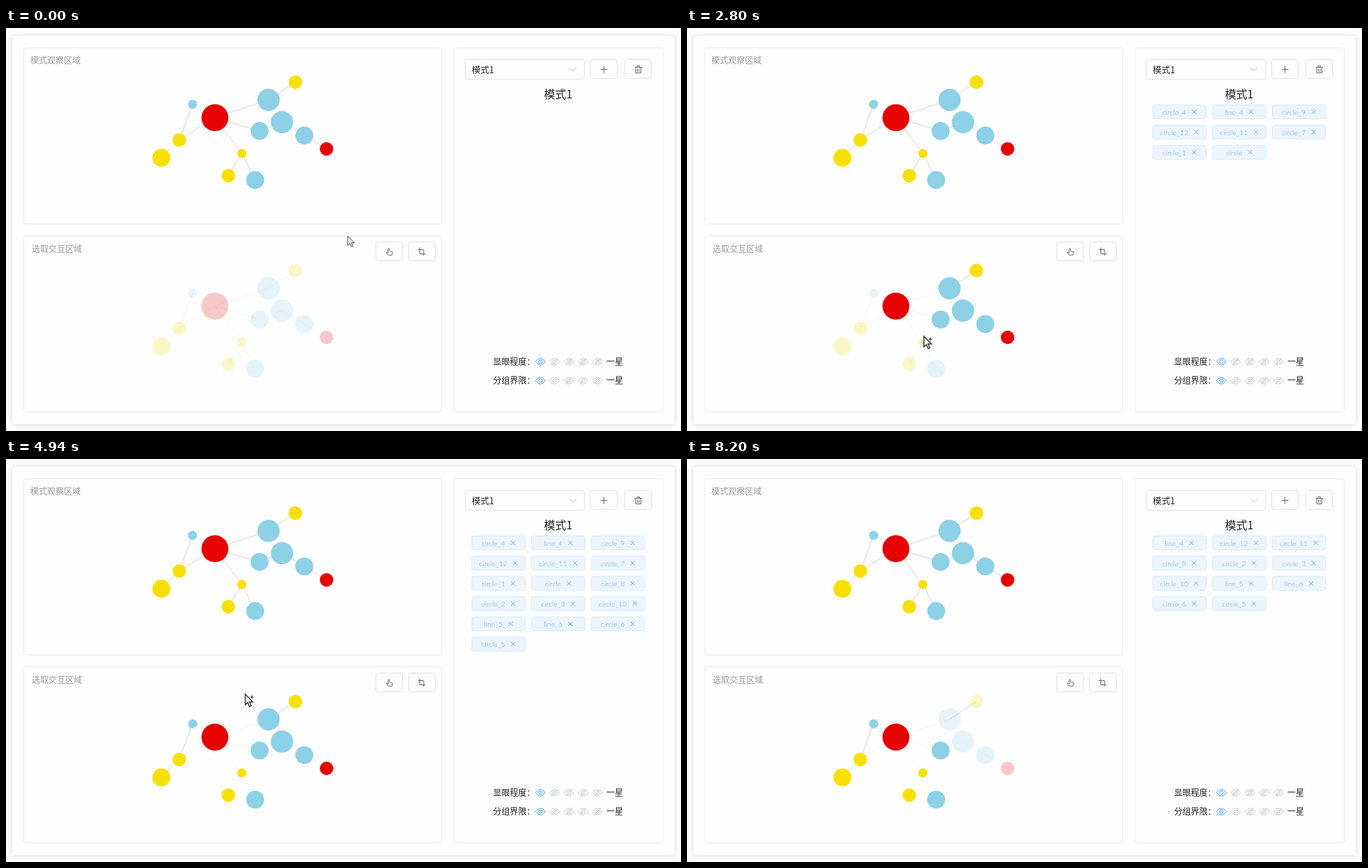
Write an HTML page that moves like this. It is 968 px wide and 579 px high and loops after 8.23 s.

```html
<!DOCTYPE html>
<html lang="zh">
<head>
<meta charset="utf-8">
<style>
html, body { margin: 0; width: 100%; height: 100%; overflow: hidden; background: #fdfefd; }
svg { display: block; }
text { font: 12px "Noto Sans CJK SC", "Noto Sans CJK", sans-serif; font-weight: 300; fill: #222; }
.box { fill: #fdfefd; stroke: #e9ebf1; }
.button { fill: #fdfefd; stroke: #dfe2e9; }
.icon { fill: none; stroke: #666; stroke-width: 1; stroke-linecap: round; stroke-linejoin: round; }
.muted { fill: #999; }
.edge { stroke: #c9cacc; stroke-width: .8; }
.tag rect { fill: #ecf5fd; stroke: #d9eafa; }
.tag text { font: 300 10.5px Lato, "Open Sans", sans-serif; fill: #62a6e3; }
.tag path { stroke: #559fe5; stroke-width: .9; }
</style>
</head>
<body>
<svg width="968" height="579" viewBox="0 0 968 579">
  <defs>
    <filter id="shadow" x="-5%" y="-5%" width="110%" height="110%">
      <feDropShadow dx="0" dy="1" stdDeviation="4" flood-color="#000" flood-opacity=".11"/>
    </filter>
    <path id="eye" d="M-7 0Q0-9.6 7 0Q0 9.6-7 0ZM-2.5 0a2.5 2.5 0 1 0 5 0a2.5 2.5 0 1 0-5 0"/>
  </defs>
  <rect x="8.5" y="10.5" width="951" height="559" rx="3" class="box" filter="url(#shadow)"/>
  <rect x="25.5" y="28.5" width="599" height="253" rx="3" class="box"/>
  <rect x="25.5" y="298.5" width="599" height="253" rx="3" class="box"/>
  <rect x="642.5" y="28.5" width="300" height="523" rx="3" class="box"/>
  <text x="35" y="50.5" class="muted">模式观察区域</text>
  <text x="37" y="321.5" class="muted">选取交互区域</text>

  <rect x="658.5" y="45.5" width="171" height="28" rx="3" class="button"/>
  <text x="668" y="64.5" style="font-size:12.5px">模式1</text>
  <path d="M808.5 57.5l4.5 4.5l4.5-4.5" class="icon" style="stroke:#b9bdc6"/>
  <g id="buttons"></g>
  <path d="M853 59.5h9M857.5 55v9" class="icon"/>
  <path d="M902 56.5h9.5M905 56v-1.5h3.5V56M903 57v7.5h7.5V57M905.5 59v3.5M908 59v3.5" class="icon"/>
  <path d="M548 323v-5.5q1-1.6 2 0v3.2l3 .6q1.5.3 1.2 1.8l-.7 3.2h-5l-3.4-3.5q.4-1.4 2.9.2" class="icon"/>
  <path d="M593.5 316v8.5h7.5M591 318.500h8v8" class="icon"/>
  <text x="792" y="100.500" text-anchor="middle" style="font-size:16px">模式1</text>
  <g id="ratings"></g>
  <g id="overview"></g>
  <g id="picker"></g>
  <g id="tags"></g>

  <g id="toast">
    <rect x="425.500" y="2.500" width="118" height="32" rx="4" fill="#f1f1f2" stroke="#e3e4e8"/>
    <circle cx="445" cy="18.500" r="5.300" fill="#8f9194"/>
    <path d="M445.200 18v3.500M445.200 15.300v1" stroke="#fff" stroke-width="1.400"/>
    <text x="457.500" y="23.500" style="fill:#909399">进入路径模式</text>
  </g>
  <g id="cursor">
    <path id="arrow" d="M0 0V14L3.300 11L5.700 16.300L7.900 15.300L5.500 10.200H10Z" fill="#fff" stroke="#333"/>
    <path id="plus" d="M9.500 1.500v5M7 4h5" stroke="#222"/>
  </g>
</svg>
<script>
const LOOP = 8230;
const SHIFT = 270.8;
const $ = id => document.getElementById(id);

function add(parent, name, attrs, content = '') {
  const el = document.createElementNS('http://www.w3.org/2000/svg', name);
  for (const key in attrs) el.setAttribute(key, attrs[key]);
  el.textContent = content;
  return parent.appendChild(el);
}

const RED = '#e60000', BLUE = '#8cd1e6', YELLOW = '#f7e000';
const nodes = {
  circle_4: [415, 77.7, 9.7, YELLOW],
  circle_9: [376.5, 103.2, 16, BLUE],
  circle_12: [299.6, 128.8, 19.3, RED],
  circle_11: [363.7, 148, 12.9, BLUE],
  circle_7: [395.8, 135.2, 16, BLUE],
  circle_1: [427.800, 154.500, 12.9, BLUE],
  circle: [459.700, 173.700, 9.700, RED],
  circle_8: [338.200, 180.200, 6.500, YELLOW],
  circle_2: [318.800, 212.200, 9.700, YELLOW],
  circle_3: [357.300, 218.500, 12.900, BLUE],
  circle_10: [222.800, 186.500, 12.900, YELLOW],
  circle_6: [248.500, 160.900, 9.700, YELLOW],
  circle_5: [267.600, 109.700, 6.500, BLUE]
};
const edges = [
  ['line_1', 'circle_12', 'circle_9'], ['line_4', 'circle_9', 'circle_4'],
  ['line_2', 'circle_12', 'circle_11'], ['line_7', 'circle_11', 'circle_7'],
  ['line_8', 'circle_7', 'circle_1'], ['line_9', 'circle_1', 'circle'],
  ['line_3', 'circle_12', 'circle_8'], ['line_10', 'circle_8', 'circle_2'],
  ['line_11', 'circle_8', 'circle_3'], ['line', 'circle_12', 'circle_6'],
  ['line_5', 'circle_6', 'circle_10'], ['line_6', 'circle_6', 'circle_5']
];

function drawGraph(parent, dy) {
  const parts = {};
  for (const [id, a, b] of edges) {
    const [x1, y1] = nodes[a], [x2, y2] = nodes[b];
    parts[id] = add(parent, 'line', { x1, y1: y1 + dy, x2, y2: y2 + dy, class: 'edge' });
  }
  for (const id in nodes) {
    const [cx, cy, r, fill] = nodes[id];
    parts[id] = add(parent, 'circle', { cx, cy: cy + dy, r, fill });
  }
  return parts;
}

drawGraph($('overview'), 0);
const parts = drawGraph($('picker'), SHIFT);

for (const [x, y] of [[838.5, 45.5], [887.5, 45.5], [530.5, 307.5], [577.5, 307.5]])
  add($('buttons'), 'rect', { x, y, width: 38, height: 27, rx: 3, class: 'button' });

[['显眼程度：', 479.5], ['分组界限：', 506.7]].forEach(([label, y]) => {
  const row = $('ratings');
  add(row, 'text', { x: 698.5, y: y + 4.5 }, label);
  add(row, 'text', { x: 861, y: y + 4.500 }, '一星');
  for (let i = 0; i < 5; i++) {
    const transform = `translate(${766.3 + i * 20.5} ${y})`;
    const stroke = i ? '#c3c6cc' : '#409eff';
    add(row, 'use', { href: '#eye', transform, fill: 'none', stroke });
    if (i) add(row, 'path', { d: 'M-5 5L5-5', transform, stroke });
  }
});

// Cursor stops: time, x, y, parts toggled there
const stops = [
  [0, 490, 299], [120, 492, 301], [420, 547, 318], [560, 547, 318],
  [900, 460, 330], [1120, 415, 348, 'circle_4'], [1260, 396, 361, 'line_4'],
  [1400, 377, 374, 'circle_9'], [1740, 300, 396, 'circle_12'], [1840, 276, 400],
  [2080, 364, 419, 'circle_11'], [2220, 396, 406, 'circle_7'],
  [2350, 428, 425, 'circle_1'], [2470, 460, 444, 'circle'], [2640, 395, 455],
  [2800, 340, 443], [2860, 338, 450, 'circle_8'], [3040, 319, 483, 'circle_2'],
  [3240, 357, 489, 'circle_3'], [3420, 300, 515], [3580, 200, 480],
  [3700, 208, 435], [3860, 223, 457, 'circle_10'], [3980, 236, 444, 'line_5'],
  [4080, 255, 412, 'line_6'], [4180, 248, 431, 'circle_6'],
  [4380, 267, 380, 'circle_5'], [4640, 305, 345], [4940, 343, 338],
  [5060, 350, 338], [5300, 415, 348, 'circle_4'], [5520, 377, 374, 'circle_9'],
  [5740, 396, 406, 'circle_7'], [5940, 428, 425, 'circle_1'],
  [6140, 460, 444, 'circle'], [6500, 497, 461], [6900, 499, 462],
  [7050, 500, 455], [7650, 520, -25], [LOOP, 520, -40]
];

function cursorAt(t) {
  const i = Math.max(0, stops.findIndex(s => s[0] > t) - 1);
  const at = k => stops[Math.max(0, Math.min(stops.length - 1, k))];
  const [a, b, c, d] = [at(i - 1), at(i), at(i + 1), at(i + 2)];
  const u = (t - b[0]) / (c[0] - b[0]);
  const slope = (p, q) => k => (q[k] - p[k]) / (q[0] - p[0] || 1) * (c[0] - b[0]);
  const start = slope(a, c), end = slope(b, d);
  return [1, 2].map(k =>
    (1 + 2 * u) * (1 - u) ** 2 * b[k] + u * (1 - u) ** 2 * start(k) +
    u * u * (3 - 2 * u) * c[k] + u * u * (u - 1) * end(k));
}

function selection(t) {
  const chosen = new Set();
  for (const [time, , , id] of stops)
    if (id && time <= t && !chosen.delete(id)) chosen.add(id);
  return [...chosen];
}

let shown = '';
function drawTags(ids) {
  if (ids.join() === shown) return;
  shown = ids.join();
  $('tags').replaceChildren();
  ids.forEach((id, i) => {
    const x = 668 + i % 3 * 85.7, y = 110.5 + Math.floor(i / 3) * 29.1;
    const tag = add($('tags'), 'g', { class: 'tag' });
    add(tag, 'rect', { x, y, width: 76.5, height: 20, rx: 3 });
    const label = add(tag, 'text', { y: y + 14 }, id);
    const width = label.getComputedTextLength();
    const left = x + 38.3 - (width + 15) / 2;
    label.setAttribute('x', left);
    add(tag, 'path', { d: `M${left + width + 8.3} ${y + 7}l6 6m0-6l-6 6` });
  });
}

const clamp = v => Math.max(0, Math.min(1, v));

function frame(now) {
  const t = now % LOOP;
  const chosen = selection(t);
  for (const id in parts) parts[id].setAttribute('opacity', chosen.includes(id) ? 1 : .21);
  drawTags(selection(t - 110));

  const toast = clamp((t - 560) / 150) * clamp((2600 - t) / 150);
  $('toast').setAttribute('opacity', toast);
  $('toast').setAttribute('transform', `translate(0 ${(toast - 1) * 36})`);

  const picking = t > 560;
  $('cursor').setAttribute('transform', `translate(${cursorAt(t)})`);
  $('arrow').setAttribute('stroke-width', picking ? 1.3 : 1);
  $('arrow').setAttribute('transform', `scale(${picking ? 1.08 : .95})`);
  $('plus').setAttribute('visibility', picking ? 'visible' : 'hidden');
  requestAnimationFrame(frame);
}
requestAnimationFrame(frame);
</script>
</body>
</html>
```
